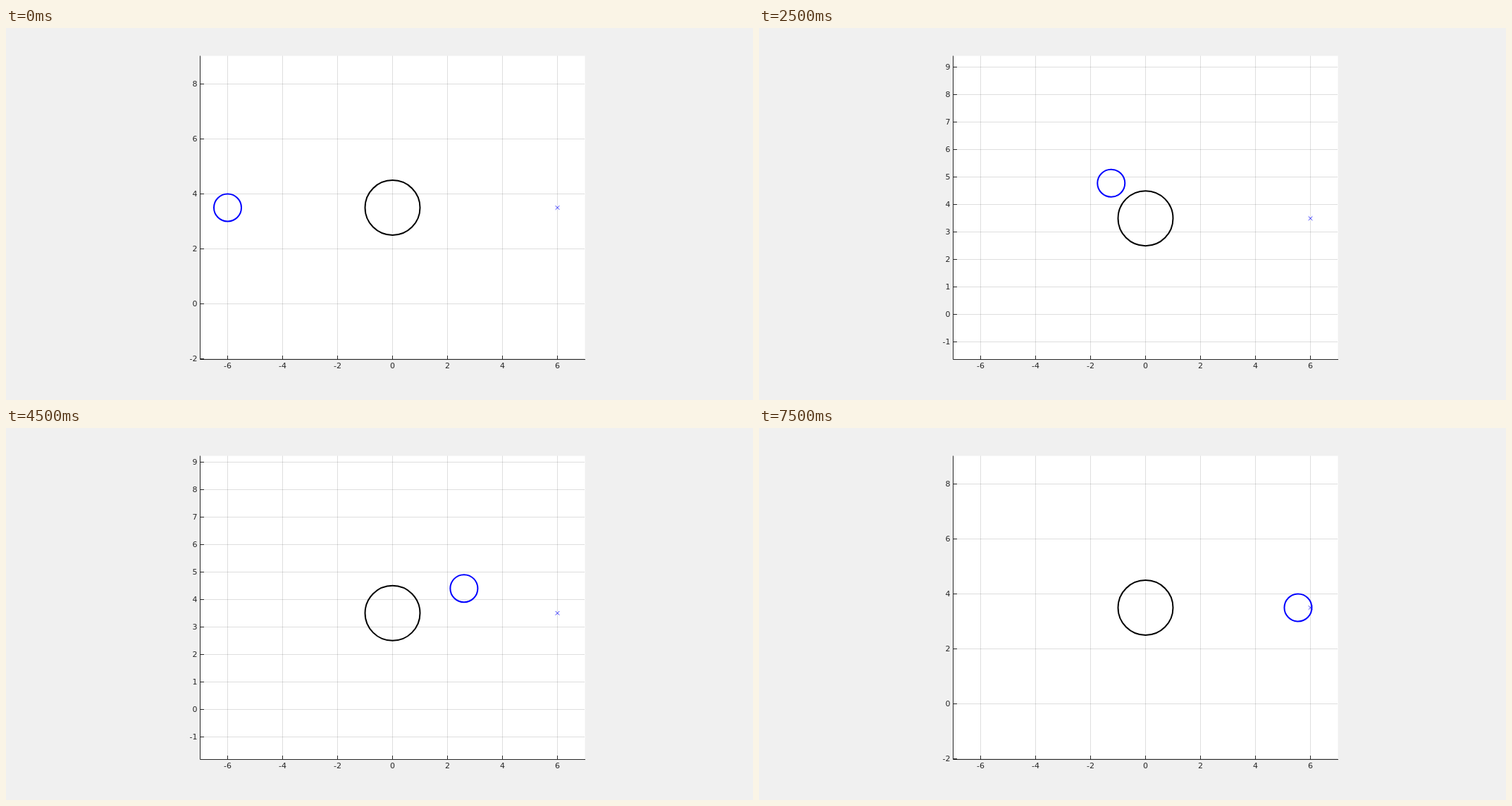
Write an HTML page that moves like this. It is 1060x528 px and loops after 8 s.

```html
<!DOCTYPE html>
<html lang="en">
<head>
<meta charset="utf-8">
<title>Circle avoiding an obstacle</title>
<style>
  html, body { margin: 0; width: 100%; height: 100%; overflow: hidden; background: #f0f0f0; }
  svg { display: block; width: 100%; height: 100%; }
  text { font: 11px "DejaVu Sans", sans-serif; fill: #262626; }
  .grid { stroke: #262626; stroke-opacity: .15; }
  .axis { stroke: #262626; fill: none; }
  .shape { fill: none; stroke-width: 2; }
</style>
</head>
<body>
<svg viewBox="0 0 1060 528">
  <rect x="275.5" y="39.5" width="546" height="431" fill="#fff"/>
  <g id="xTicks"></g>
  <g id="yTicks"></g>
  <path class="axis" d="M275.5 39.5V470.5H822"/>
  <circle id="obstacle" class="shape" r="39" stroke="#000"/>
  <path id="goal" d="M-2.8 -2.8L2.8 2.8M-2.8 2.8L2.8 -2.8" stroke="#00f" stroke-width=".8"/>
  <circle id="agent" class="shape" r="19.5" stroke="#00f"/>
</svg>
<script>
const UNIT = 39, LEFT = 275.5, RIGHT = 821, TOP = 39.5, BOTTOM = 470.5;
const STEP = 500;
// Agent positions, relative to the obstacle's centre.
const PATH = [
  [-6, 0], [-4.98, .02], [-3.97, .04], [-3, .29],
  [-2.12, .75], [-1.25, 1.28], [-.28, 1.51], [.69, 1.5],
  [1.65, 1.2], [2.6, .9], [3.55, .55], [4.27, .35],
  [4.79, .19], [5.15, .1], [5.375, .05], [5.55, 0]
];
const $ = id => document.getElementById(id);
const px = x => 548.5 + x * UNIT;

function line(cls, x1, y1, x2, y2) {
  return `<path class="${cls}" d="M${x1} ${y1}L${x2} ${y2}"/>`;
}

function label(x, y, anchor, value) {
  return `<text x="${x}" y="${y}" text-anchor="${anchor}">${value}</text>`;
}

function xTicks() {
  let out = "";
  for (let v = -6; v <= 6; v += 2) {
    const x = px(v);
    out += line("grid", x, TOP, x, BOTTOM) +
           line("axis", x, BOTTOM, x, BOTTOM - 5.5) +
           label(x, 483, "middle", v);
  }
  return out;
}

function yTicks(centre, step) {
  let out = "";
  for (let v = -2; v <= 9; v += step) {
    const y = Math.ceil(centre - (v - 3.5) * UNIT) - .5;
    if (y < TOP || y > 470) continue;
    out += line("grid", LEFT, y, RIGHT, y) +
           line("axis", LEFT, y, LEFT + 5.5, y) +
           label(271.5, y + 3.5, "end", v);
  }
  return out;
}

function place(el, x, y) {
  el.setAttribute("transform", `translate(${x} ${y})`);
}

function draw(index) {
  const [x, y] = PATH[index];
  // The view stays centred on the vertical extent of both circles.
  const shift = Math.max(0, (y - .5) / 2) * UNIT;
  const centre = 255 + shift;
  $("yTicks").innerHTML = yTicks(centre, shift > 0 ? 1 : 2);
  place($("obstacle"), px(0), centre);
  place($("goal"), px(6), centre);
  place($("agent"), px(x), centre - y * UNIT);
}

let shown = -1;
function tick() {
  const index = Math.floor(performance.now() / STEP) % PATH.length;
  if (index !== shown) draw(shown = index);
  requestAnimationFrame(tick);
}

$("xTicks").innerHTML = xTicks();
tick();
</script>
</body>
</html>
```
